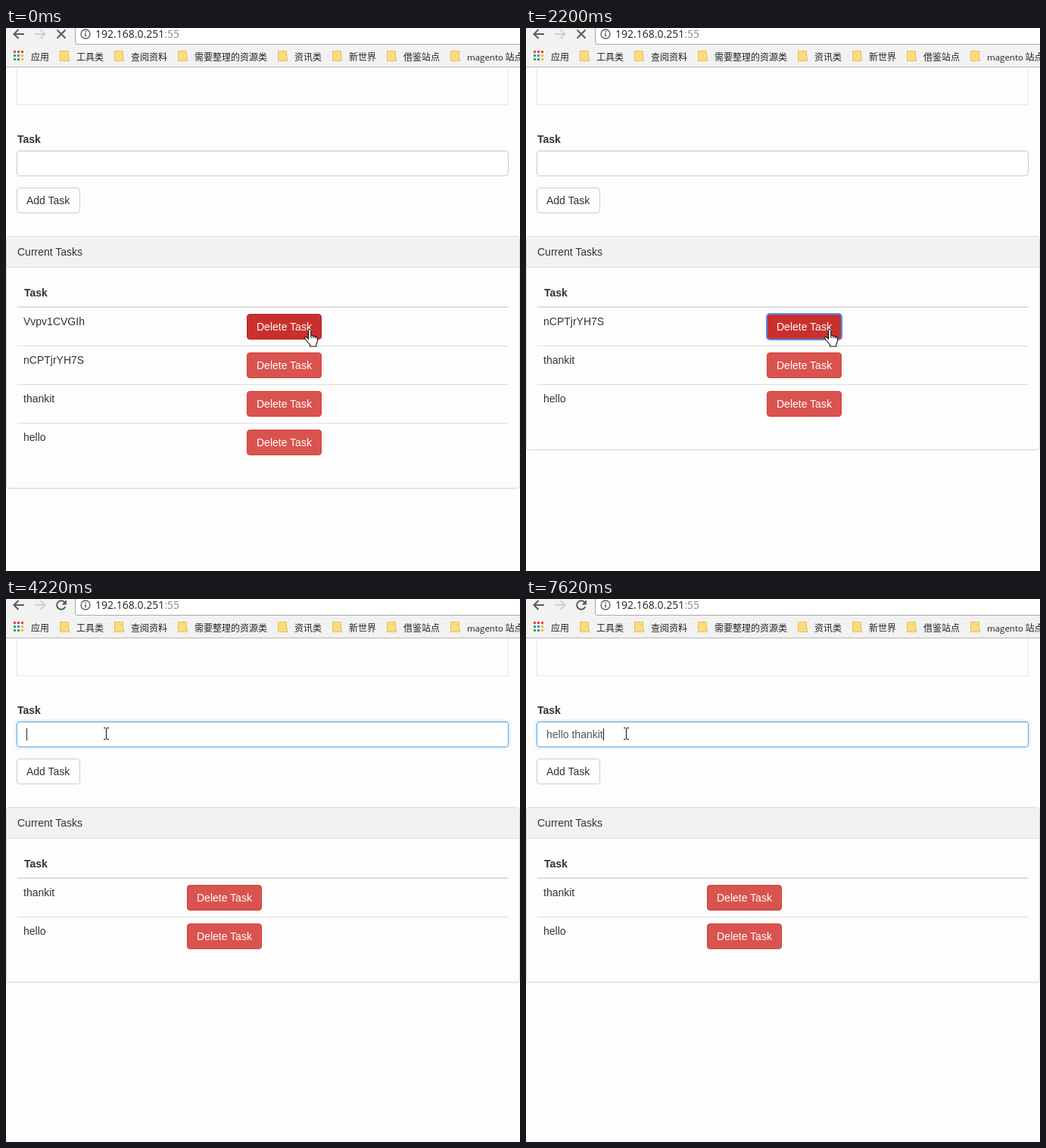
Animation of 679x718 px, one loop 8000 ms. Source, as an HTML page:

```html
<!DOCTYPE html>
<html lang="zh">
<head>
<meta charset="utf-8">
<title>Task list</title>
<style>
html, body { margin: 0; width: 100%; height: 100%; overflow: hidden; }
body { position: relative; background: #fdfdfd; color: #333; font: 14px/20px "Liberation Sans", Arial, sans-serif; }
div, svg { position: absolute; box-sizing: border-box; white-space: pre; }
svg { left: 0; top: 0; overflow: visible; }
b { position: absolute; }
.btn { width: 99px; height: 34px; padding: 6px 12px; border: 1px solid #d43f3a; border-radius: 4px; background: #d9534f; color: #fff; }
.btn.hover { background: #c9302c; border-color: #ac2925; }
.btn.down { background: #ac2925; border-color: #761c19; box-shadow: inset 0 3px 5px #0002; }
.btn.ring { outline: 2px solid #4d90fe; outline-offset: -1px; }
#bar { left: 0; top: 0; width: 679px; height: 52px; background: #f2f2f2; border-bottom: 1px solid #b8b8b8; overflow: hidden; }
#url { left: 91px; top: -6px; width: 620px; height: 28px; background: #fff; border: 1px solid #aaa; border-radius: 3px; }
#addr { left: 118px; top: -2px; font: 14px/20px "Open Sans", sans-serif; color: #222; }
#addr span { color: #888; }
.mark { top: 28px; color: #222; font: 12px/20px "Noto Sans CJK SC", "Noto Sans CJK", sans-serif; }
.mark span { font: 11.5px "Open Sans", sans-serif; }
#well { left: 14px; top: 40px; width: 650px; height: 62px; border: 1px solid #e6e6e6; }
#input { left: 14px; top: 162px; width: 650px; height: 34px; padding: 6px 12px; border: 1px solid #ccc; border-radius: 4px; background: #fff; color: #555; }
#caret { position: absolute; top: 8px; width: 1px; height: 16px; background: #222; }
#add { left: 14px; top: 211px; width: 84px; background: #fff; border-color: #ccc; color: #333; }
#hint { left: 14px; top: 196px; width: 652px; height: 26px; border: 1px solid #d4d4d4; background: #fff; color: #000; padding: 2px 8px; font-weight: bold; font-size: 13.33px; }
#panel { left: 0; top: 275px; width: 679px; border: 1px solid #ddd; border-radius: 4px; box-shadow: 0 1px 1px #0000000d; }
#head { left: 0; top: 0; width: 677px; height: 41px; padding: 10px 14px; background: #f2f2f2; border-bottom: 1px solid #ddd; border-radius: 3px 3px 0 0; }
#rule { left: 15px; top: 368px; width: 648px; height: 2px; background: #ddd; }
.row { left: 15px; width: 648px; height: 51px; padding: 8px; }
.row + .row { border-top: 1px solid #ddd; padding-top: 8px; }
</style>
</head>
<body>
<div id="well"></div>
<div id="bar">
  <div id="url"></div>
  <div id="addr">192.168.0.251<span>:55</span></div>
  <svg id="icons" width="679" height="52" fill="none" stroke="#5a5a5a" stroke-width="2">
    <path d="M24 8H10.5M16.5 2l-6 6 6 6"/>
    <path d="M38 8H51.5M45.500 2l6 6-6 6" stroke="#d0d0d0"/>
    <path id="stop" d="M67.500 2.500l11 11M78.500 2.500l-11 11"/>
    <g id="reload"><path d="M78.300 10.200A5.800 5.800 0 1 1 77.200 4"/><path d="M80 1v6.500h-6.500z" fill="#5a5a5a" stroke="none"/></g>
    <g stroke-width="1.300"><circle cx="105" cy="8" r="6"/><path d="M105 7v4.500M105 4.300v1.600" stroke-width="1.600"/></g>
  </svg>
</div>
<b style="left:15px;top:137px">Task</b>
<div id="input"><span id="typed"></span><i id="caret"></i></div>
<div id="add" class="btn">Add Task</div>
<div id="hint">hello</div>
<div id="panel"><div id="head">Current Tasks</div></div>
<b style="left:24px;top:340px">Task</b>
<div id="rule"></div>
<div id="rows"></div>
<svg width="679" height="718">
  <g id="hand" transform="translate(394 398)" fill="#fff" stroke="#111" stroke-width="1.100" stroke-linejoin="round">
    <path d="M5.500 13.500V2.200a1.700 1.700 0 0 1 3.400 0V8.500l3.400.7 3 .9q2.200.6 2.200 2.600v3.600l-1.600 3.400v3.300H7.500v-2L4 16.500 1 13q-.8-1.600.6-2.200t2 .4z"/>
    <path d="M8.900 8.500v3.500M12 9.200v3M14.800 10v2.600"/>
  </g>
  <path id="arrow" d="M.5.5v16l3.700-3.500 2.500 5.700 2.400-1-2.500-5.600h5.100z" fill="#fff" stroke="#111"/>
  <path id="beam" d="M129 170.500h2.500l1 1 1-1h2.500M132.500 171v14M129 185.500h2.500l1-1 1 1h2.500" fill="none" stroke="#111"/>
</svg>
<script>
const $ = id => document.getElementById(id);
const show = (id, on) => $(id).style.display = on ? '' : 'none';
const between = (t, a, b) => t >= a && t < b;

// Latest value in a list of [start, value] pairs.
const at = (steps, t) => steps.reduce((v, [start, next]) => t >= start ? next : v, null);

// Bookmarks bar
const marks = [[93, '工具类'], [165, '查阅资料'], [249, '需要整理的资源类'], [381, '资讯类'],
  [453, '新世界'], [525, '借鉴站点'], [609, '<span>magento</span> 站点']];
const label = (x, text) => $('bar').insertAdjacentHTML('beforeend', `<div class="mark" style="left:${x}px">${text}</div>`);
const draw = shape => $('icons').insertAdjacentHTML('beforeend', shape);
label(33, '应用');
for (const [x, text] of marks) {
  label(x, text);
  draw(`<path d="M${x - 21.5} 30.500h11v9h1v4h-12z" fill="#fbdc7c" stroke="#e9c158" stroke-width="1"/>`);
}
const dots = ['#e8453c', '#e8453c', '#e8453c', '#3aa757', '#4688f1', '#f9bb2d', '#3aa757', '#3aa757', '#f9bb2d'];
dots.forEach((c, i) => draw(`<rect x="${10 + i % 3 * 5}" y="${30 + (i / 3 | 0) * 5}" width="3" height="3" fill="${c}" stroke="none"/>`));

// Task table
const tasks = ['Vvpv1CVGIh', 'nCPTjrYH7S', 'thankit', 'hello'];
let drawn = '';
function table(skip, look) {
  const key = skip + look;
  if (key === drawn) return;
  drawn = key;
  const list = tasks.slice(skip), x = list.length > 2 ? 303 : 224;
  $('rows').innerHTML = list.map((name, i) => {
    const edge = i ? 1 : 0;
    return `<div class="row" style="top:${370 + 51 * i - edge}px;height:${51 + edge}px">${name}` +
      `<div class="btn ${i ? '' : look}" style="left:${x}px;top:8px">Delete Task</div></div>`;
  }).join('');
  $('panel').style.height = 130 + 51 * list.length + 'px';
}

const looks = [[0, 'hover'], [1090, 'down ring'], [1240, 'hover ring'], [1490, ''],
  [2050, 'down ring'], [2200, 'hover ring'], [2450, '']];
const typing = [[0, 0], [4650, 2], [4930, 3], [5060, 4], [5180, 5], [6200, 6], [6470, 7],
  [6620, 8], [6900, 9], [7020, 10], [7320, 11], [7470, 12], [7620, 13]];
const glow = [[0, 0], [3140, .35], [3260, .85], [3380, 1]];
const moves = [[0, [380, 374]], [2750, [215, 236]], [2870, [134, 205]]];

function frame(now) {
  const t = now % 8000;
  table(at([[0, 0], [1490, 1], [2450, 2]], t), at(looks, t));

  const loading = t < 1490 || between(t, 2200, 2600);
  show('stop', loading);
  show('reload', !loading);

  show('hand', t < 2600);
  show('arrow', between(t, 2600, 2990));
  show('beam', t >= 2990);
  $('arrow').setAttribute('transform', `translate(${at(moves, t)})`);

  const focus = at(glow, t), mix = (a, b) => a + (b - a) * focus;
  const style = $('input').style;
  style.borderColor = `rgb(${mix(204, 102)},${mix(204, 175)},${mix(204, 233)})`;
  style.boxShadow = `inset 0 1px 1px #00000013, 0 0 4px rgba(102,175,233,${.6 * focus})`;
  $('typed').textContent = 'hello thankit'.slice(0, at(typing, t));
  show('caret', t >= 3140 && !between(t, 3660, 4220) && !between(t, 5770, 6200));
  show('hint', between(t, 4650, 6200));
}

const start = performance.now();
function loop() {
  frame(performance.now() - start);
  requestAnimationFrame(loop);
}
loop();
</script>
</body>
</html>
```
